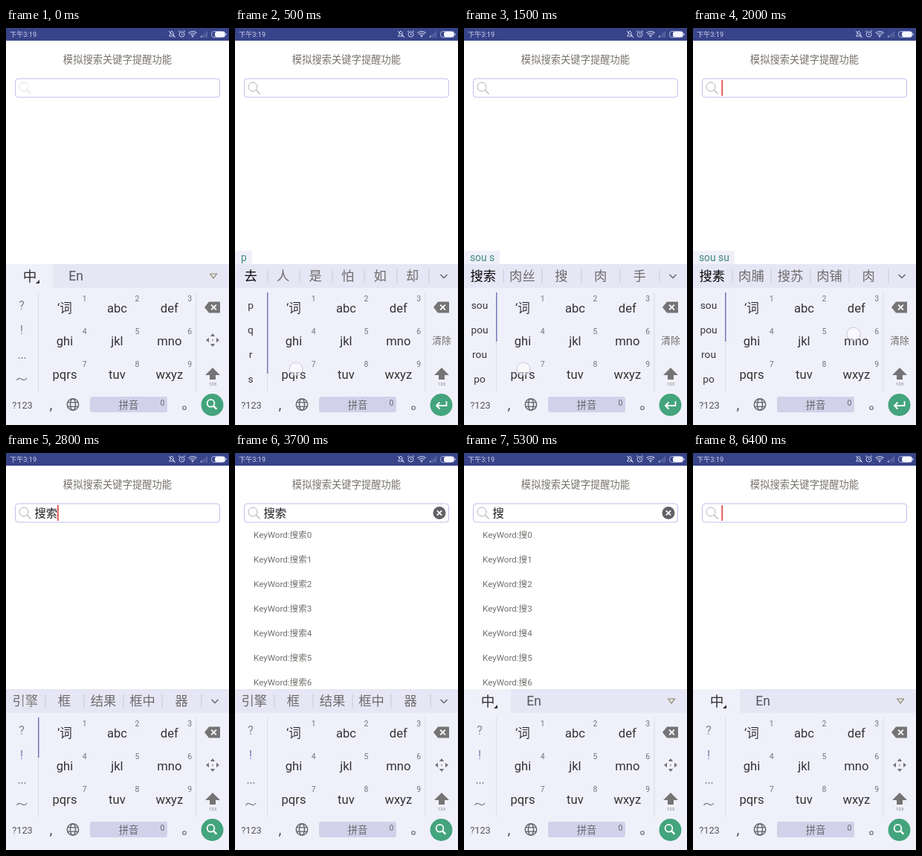
Write an HTML page with a canvas that moves like this. It is 300 px wide and 533 px high and loops after 6500 ms.

```html
<!DOCTYPE html>
<html lang="zh-CN">
<head>
<meta charset="utf-8">
<style>
html, body { margin: 0; width: 100%; height: 100%; overflow: hidden; background: #fff; }
canvas { display: block; width: 100vw; height: 100vh; }
</style>
</head>
<body>
<canvas id="stage"></canvas>
<script>
const W = 300, H = 533, LOOP = 6500;
const canvas = document.getElementById('stage');
const ratio = window.devicePixelRatio || 1;
canvas.width = W * ratio;
canvas.height = H * ratio;
const c = canvas.getContext('2d');
const FONT = 'Roboto, "Noto Sans CJK SC", "Noto Sans CJK", sans-serif';
const DARK = '#333336', MID = '#6c6c6c', ICON = '#747476', GREEN = '#43a47d';
const BOARD = '#f0f0fa', BAR = '#e6e6f5';

// Each step of the pinyin input: start, composed text, candidates, syllables
const TYPING = [
  { at: 500, pinyin: 'p', words: '去 人 是 怕 如 却', side: 'p q r s', bar: 464 },
  { at: 800, pinyin: 'po', words: '是 上 去 人 说 时', side: 'po p q r', bar: 464 },
  { at: 1200, pinyin: 'sou', words: '搜 肉 所 破 手 否', side: 'sou pou rou po', bar: 421 },
  { at: 1500, pinyin: 'sou s', words: '搜索 肉丝 搜 肉 手', side: 'sou pou rou po', bar: 421 },
  { at: 1800, pinyin: 'sou su', words: '搜素 肉脯 搜苏 肉铺 肉', side: 'sou pou rou po', bar: 421 },
  { at: 2100, pinyin: 'sou suo', words: '搜索 搜所 搜 肉 手', side: 'sou pou rou po', bar: 421 }
];
const COMMIT = 2700, LIST = 3000, ERASE = 4700, CLEAR = 6000;
const TOUCHES = [
  [400, 700, 82, 458], [750, 1000, 232, 413], [1080, 1350, 153, 459], [1400, 1650, 80, 458],
  [1700, 1900, 152, 459], [1950, 2250, 216, 411], [2500, 2850, 29, 334],
  [4600, 4900, 277, 376], [5850, 6100, 275, 81]
];

function text(s, x, y, size, color = DARK, align = 'center', weight = 400) {
  c.font = `${weight} ${size}px ${FONT}`;
  c.textAlign = align;
  c.textBaseline = 'alphabetic';
  c.fillStyle = color;
  c.fillText(s, x, y + size * 0.37);
}
function rect(x, y, w, h, color) {
  c.fillStyle = color;
  c.fillRect(x, y, w, h);
}
function round(x, y, w, h, r) {
  c.beginPath();
  c.roundRect(x, y, w, h, r);
}
function disc(x, y, r, color) {
  c.fillStyle = color;
  c.beginPath();
  c.arc(x, y, r, 0, Math.PI * 2);
  c.fill();
}
function ring(x, y, r, color, width = 1, from = 0, to = Math.PI * 2) {
  c.strokeStyle = color;
  c.lineWidth = width;
  c.beginPath();
  c.arc(x, y, r, from, to);
  c.stroke();
}
function trace(points) {
  c.beginPath();
  for (let i = 0; i < points.length; i += 2) c.lineTo(points[i], points[i + 1]);
}
function line(points, color, width = 1) {
  trace(points);
  c.strokeStyle = color;
  c.lineWidth = width;
  c.stroke();
}
function shape(points, color) {
  trace(points);
  c.fillStyle = color;
  c.fill();
}
function lens(x, y, r, color, width) {
  ring(x, y, r, color, width);
  const d = r * 0.72;
  line([x + d, y + d, x + r * 1.6, y + r * 1.6], color, width * 1.3);
}
function cross(x, y, r, color, width) {
  line([x - r, y - r, x + r, y + r], color, width);
  line([x + r, y - r, x - r, y + r], color, width);
}

function statusBar() {
  const ink = '#cdd2f0';
  rect(0, 0, W, 17, '#384489');
  text('下午3:19', 5, 8.5, 9.2, ink, 'left');
  line([219.5, 11, 221, 9, 221, 6, 223, 4, 225, 6, 225, 9, 226.5, 11, 219.5, 11], ink);
  line([219, 4, 228, 13], ink);
  ring(236.5, 8.5, 3.5, ink);
  line([236.5, 6.5, 236.5, 9, 238, 9], ink, 0.8);
  line([232, 5, 234, 3.5], ink);
  line([239, 3.5, 241, 5], ink);
  for (const r of [2.5, 5, 7.5]) ring(251, 12, r, ink, 1.2, -Math.PI * 0.76, -Math.PI * 0.24);
  disc(251, 11.5, 1, ink);
  for (let i = 0; i < 4; i++) rect(262 + i * 2.5, 10.5 - i * 2, 1.5, 2 + i * 2, i ? '#5f6ba6' : ink);
  c.strokeStyle = '#aab1de';
  c.lineWidth = 1;
  round(276.5, 4.5, 18.5, 8, 3.5);
  c.stroke();
  round(281, 5, 13.5, 7, 2.5);
  c.fillStyle = '#f4f5ff';
  c.fill();
  rect(295.5, 7, 1, 3, ink);
}

function cursorOn(t) {
  if (t < 1000) return false;
  if (t < COMMIT) return t % 1000 < 500;
  const start = t < ERASE ? COMMIT : t < CLEAR ? ERASE : CLEAR;
  return Math.floor((t - start) / 520) % 2 === 0;
}

function searchPage(t) {
  const value = t < COMMIT || t >= CLEAR ? '' : t < ERASE ? '搜索' : '搜';
  text('模拟搜索关键字提醒功能', 150, 42.5, 13.3, '#77736c');
  c.strokeStyle = '#bdbff0';
  c.lineWidth = 1;
  round(12.5, 68, 275, 25, 4);
  c.stroke();
  c.globalAlpha = t < 300 ? 0.35 : 1;
  lens(24, 79, 6, '#b0b0b8', 1);
  c.globalAlpha = 1;
  text(value, 38.5, 80.5, 15.3, '#202124', 'left');
  if (cursorOn(t)) rect(38.2 + value.length * 15.3, 70, 2, 21, '#e45b5b');
  if (!value || t < LIST) return;
  disc(275, 80.5, 8.5, '#626266');
  cross(275, 80.5, 3.2, '#fff', 1.7);
  c.save();
  c.beginPath();
  c.rect(0, 94, W, 223);
  c.clip();
  for (let i = 0; i < 7; i++) text(`KeyWord:${value}${i}`, 25, 110 + i * 33, 11.6, '#74716c', 'left');
  c.restore();
}

function idleBar() {
  rect(63, 317, 237, 32, BAR);
  text('中', 32, 333, 18.7);
  shape([45, 338, 45, 343, 40, 343], DARK);
  text('En', 94, 333, 17.5, '#55565c');
  line([274.5, 330, 283.5, 330, 279, 336, 274.5, 330], '#8a8561', 1.2);
}

function candidateBar(words, chosen) {
  const list = words.split(' ');
  const step = list.length > 5 ? 43.5 : 52.6;
  rect(0, 317, W, 32, BAR);
  list.forEach((word, i) => {
    const lead = chosen && i === 0;
    text(word, step * (i + 0.5) - 0.5, 333, 17.3, lead ? '#08080a' : MID, 'center', lead ? 500 : 400);
    rect(Math.round(step * (i + 1)) - 0.5, 324, 1, 18, '#cacad4');
  });
  line([276.5, 331, 281, 335.5, 285.5, 331], '#66676c', 1.5);
}

function composing(pinyin) {
  c.font = `13.8px ${FONT}`;
  rect(0, 299, c.measureText(pinyin).width + 15, 18, BOARD);
  text(pinyin, 8, 308, 13.8, '#3f8b7d', 'left');
}

function sideColumn(step, t) {
  const scrollBar = bottom => rect(43, 355, 1.5, bottom - 355, '#7478b4');
  rect(43, 355, 1, 134, '#dcdce8');
  rect(255.5, 355, 1, 134, '#dcdce8');
  if (step) {
    step.side.split(' ').forEach((s, i) => text(s, 21, 372 + i * 33, 13.7));
    scrollBar(step.bar);
    return;
  }
  if (t >= COMMIT && t < 3200) scrollBar(409);
  text('?', 21, 372, 16, '#85858c');
  text('!', 21, 405, 16, t < 300 ? '#85858c' : '#777cb8');
  for (const x of [17.5, 21.5, 25.5]) disc(x, 443, 0.9, '#77777e');
  c.beginPath();
  c.moveTo(14.5, 473);
  c.bezierCurveTo(19, 465, 23, 478, 28, 470);
  c.strokeStyle = '#77777e';
  c.lineWidth = 1.2;
  c.stroke();
}

function keys() {
  '‘词 abc def ghi jkl mno pqrs tuv wxyz'.split(' ').forEach((key, i) => {
    const col = i % 3, row = Math.floor(i / 3);
    text(key, 79 + col * 70.4, 375.5 + row * 44.7, 16.6);
    text(i + 1, 105.7 + col * 70.7, 363 + row * 44.3, 10.5, '#74757a');
  });
}

function moveIcon() {
  for (let i = 0; i < 4; i++) {
    c.save();
    c.translate(278, 419);
    c.rotate(i * Math.PI / 2);
    shape([0, -9, 3.2, -5, -3.2, -5], ICON);
    c.restore();
  }
  disc(278, 419, 1.2, '#aaaab0');
}

function rightColumn(typing) {
  shape([267, 375, 273, 367.5, 288, 367.5, 288, 382.5, 273, 382.5], ICON);
  cross(279.5, 375, 3.4, '#fff', 1.8);
  if (typing) text('清除', 278, 419, 12.8, MID);
  else moveIcon();
  shape([278, 456, 288, 466, 282, 466, 282, 472, 274, 472, 274, 466, 268, 466], ICON);
  text('123', 278, 477.5, 6, ICON);
}

function globe(x, y) {
  const ink = '#66676c';
  ring(x, y, 7.7, ink, 1.5);
  c.beginPath();
  c.ellipse(x, y, 3.5, 7.7, 0, 0, Math.PI * 2);
  c.stroke();
  for (const d of [-2.8, 2.8]) line([x - 7, y + d, x + 7, y + d], ink, 1.3);
}

function bottomRow(typing) {
  text('?123', 22, 506, 12.8, '#55565b');
  text(',', 60.5, 505, 20, '#55565b');
  globe(90, 505.5);
  round(113, 495, 104, 21, 3);
  c.fillStyle = '#d1d1ea';
  c.fill();
  text('拼音', 165, 506, 13.3, '#66676c');
  text('0', 210.5, 503, 10.5, '#66676c');
  ring(240, 510, 2.3, '#66676c', 1.1);
  disc(277.5, 506, 15, GREEN);
  if (typing) {
    line([284.5, 501, 284.5, 507, 271, 507], '#fff', 1.8);
    line([275.5, 502.5, 271, 507, 275.5, 511.5], '#fff', 1.8);
  } else {
    lens(275.5, 503.8, 4.9, '#fff', 1.8);
  }
}

function keyboard(t) {
  const step = t < COMMIT ? TYPING.filter(s => s.at <= t).pop() : null;
  rect(0, 317, W, H - 317, BOARD);
  if (step) {
    composing(step.pinyin);
    candidateBar(step.words, true);
  } else if (t >= COMMIT && t < ERASE) {
    candidateBar('引擎 框 结果 框中 器', false);
  } else {
    idleBar();
  }
  sideColumn(step, t);
  keys();
  rightColumn(!!step);
  bottomRow(!!step);
}

// A touch dot holds while pressed, then fades out
function touches(t) {
  for (const [from, to, x, y] of TOUCHES) {
    if (t < from || t >= to) continue;
    c.globalAlpha = Math.min(1, (to - t) / 150);
    disc(x, y, 9, 'rgba(255,255,255,.5)');
    ring(x, y, 9, 'rgba(150,150,195,.45)');
    c.globalAlpha = 1;
  }
}

function draw(now) {
  const t = now % LOOP;
  c.setTransform(ratio, 0, 0, ratio, 0, 0);
  rect(0, 0, W, H, '#fff');
  statusBar();
  searchPage(t);
  keyboard(t);
  touches(t);
}

let begin = null;
function tick(now) {
  if (begin === null) begin = now;
  draw(now - begin);
  requestAnimationFrame(tick);
}
requestAnimationFrame(tick);
</script>
</body>
</html>
```
